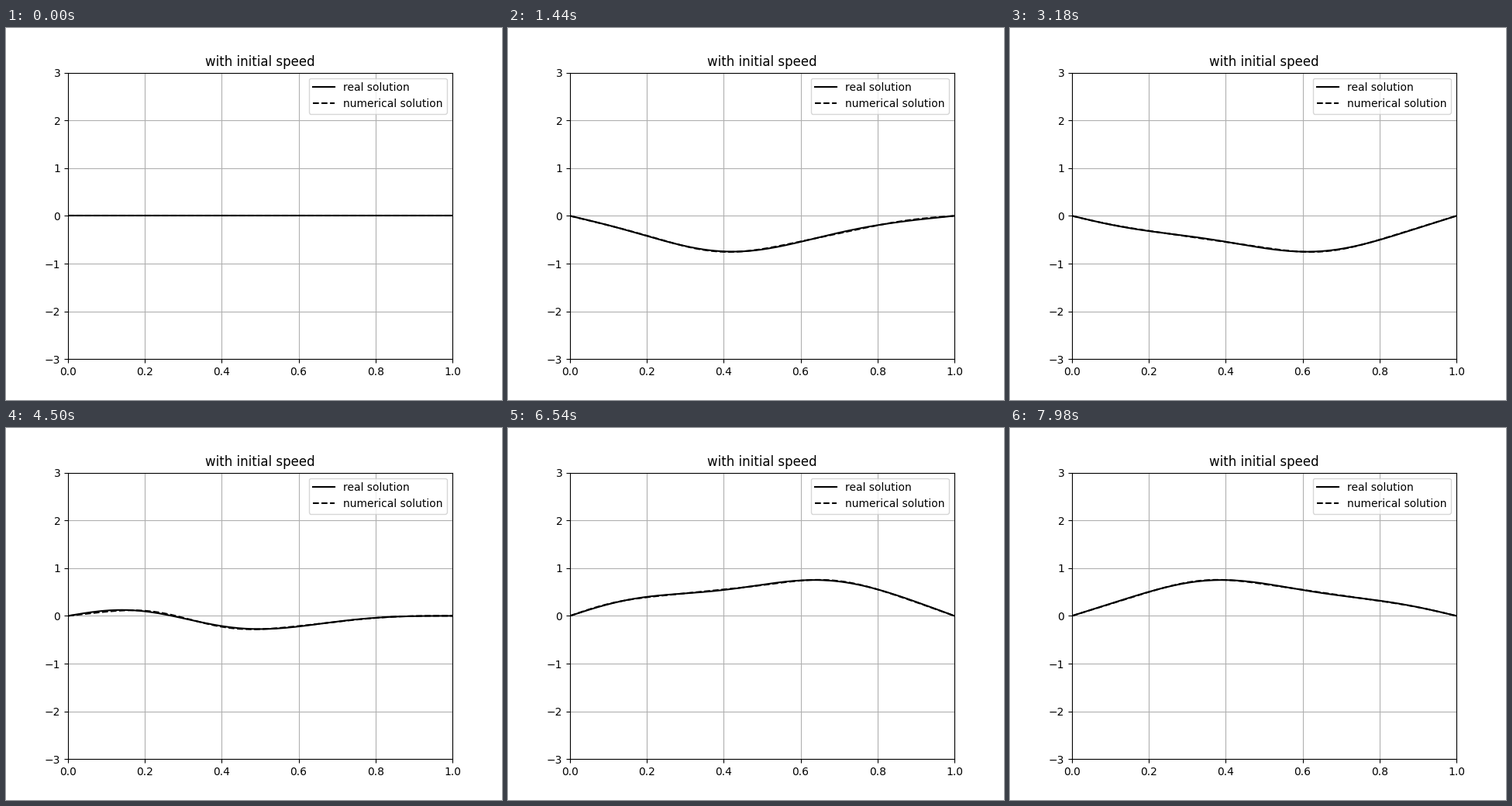
These frames come from a looping animation (640 px wide and 480 px high, 8000 ms). A matplotlib script:

```python
import numpy as np
import matplotlib.pyplot as plt
from matplotlib.animation import FuncAnimation

TICK = 20          # ms per drawn frame
STEP = 60          # ms per time step of the string
LOOP = 8000        # ms
HALF_PERIOD = 80   # time steps in half an oscillation

# Amplitudes of the standing waves sin(n pi x) sin(n pi s), n = 1, 2, ...
REAL = np.array([-0.785, -0.14, 0.222, -0.04])
NUMERICAL = np.append(REAL, [-0.008, 0.014, -0.005])

x = np.linspace(0, 1, 201)


def string(amps, s):
    n = np.arange(1, len(amps) + 1)
    return (amps * np.sin(n * np.pi * s)) @ np.sin(np.pi * np.outer(n, x))


fig, ax = plt.subplots(figsize=(6.4, 4.8), dpi=100)
ax.set_title("with initial speed")
ax.set_xlim(0, 1)
ax.set_ylim(-3, 3)
ax.grid(True)
real_line, = ax.plot(x, 0 * x, "k-", label="real solution")
num_line, = ax.plot(x, 0 * x, "k--", label="numerical solution")
ax.legend(loc="upper right")


def update(i):
    s = (i * TICK // STEP) / HALF_PERIOD
    real_line.set_ydata(string(REAL, s))
    num_line.set_ydata(string(NUMERICAL, s))
    return real_line, num_line


def init():
    return update(0)


anim = FuncAnimation(fig, update, frames=LOOP // TICK, init_func=init,
                     interval=TICK, repeat=True, repeat_delay=0, blit=True)
plt.show()
```
